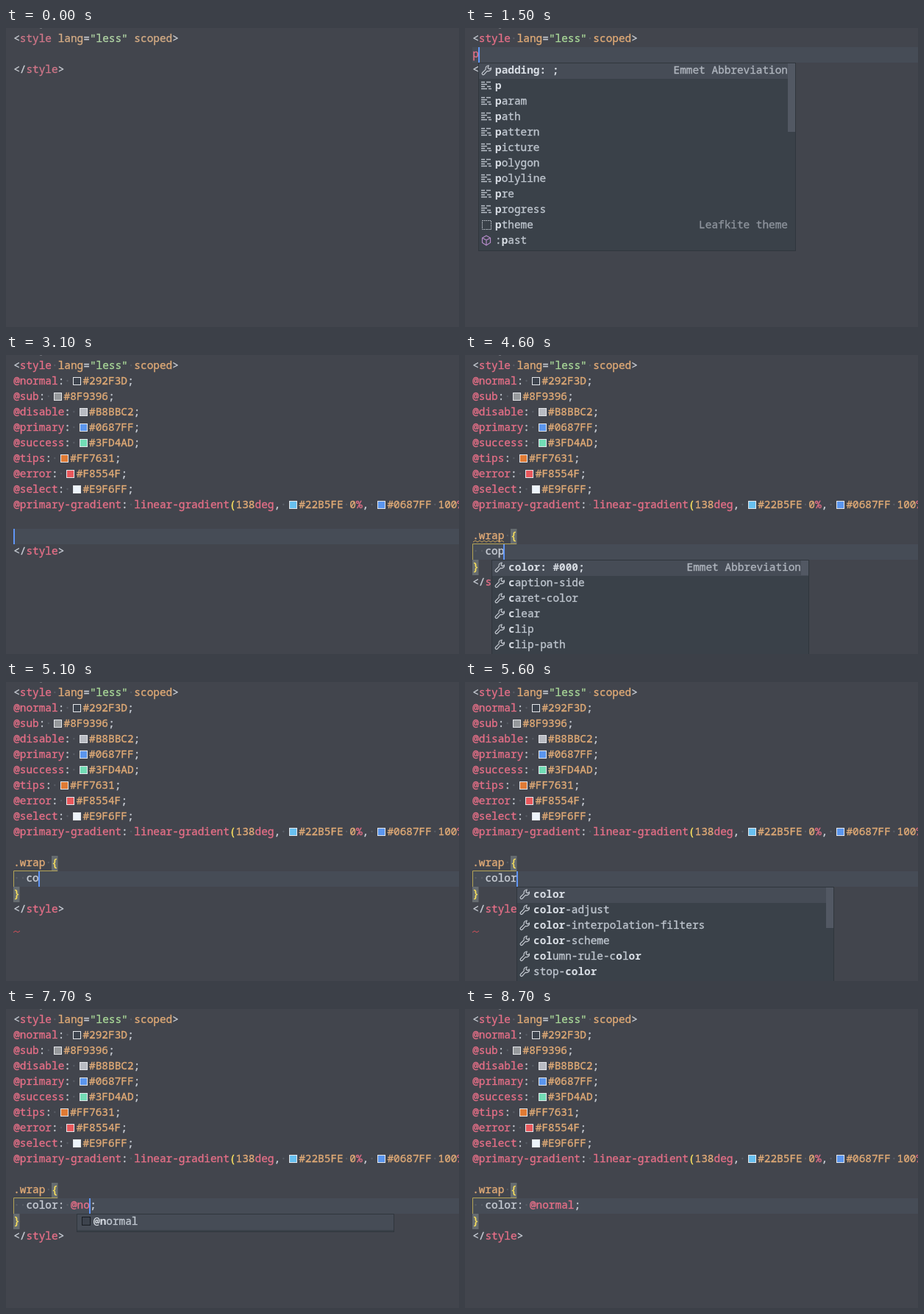
An HTML page for the animation above (8800 ms loop, 616 by 406 pixels).

```html
<!DOCTYPE html>
<html lang="en">
<head>
<meta charset="utf-8">
<title>Theme snippet in a code editor</title>
<style>
  html, body { margin: 0; width: 100%; height: 100%; overflow: hidden; background: #42454d; }
  svg { display: block; width: 616px; height: 406px; }
  text { font: 500 14.4px "Noto Sans Mono", "DejaVu Sans Mono", monospace; white-space: pre; stroke-width: .35px; }
  .bold { font-weight: 700; fill: #d8dde4; stroke: none; }
</style>
</head>
<body>
<svg id="stage" viewBox="0 0 616 406"></svg>
<script>
const stage = document.getElementById('stage');
const LOOP = 8800, CELL = 8.64, LEFT = 10.2, ROW = 21;
const PINK = '#e56f87', ORANGE = '#e0aa76', GREEN = '#a9d898', YELLOW = '#fbe25e';
const PLAIN = '#c9ced6', DOT = '#5a5f68';

// Swatch tones as they appear on screen
const tones = {
  '#292F3D': '#3d434d', '#8F9396': '#96999c', '#B8BBC2': '#b8bbc2', '#0687FF': '#5b96ee',
  '#3FD4AD': '#72dcb5', '#FF7631': '#e07b35', '#F8554F': '#e8585c', '#E9F6FF': '#edf3fa',
  '#22B5FE': '#68c0f0'
};

const HEAD = '<style lang="less" scoped>', TAIL = '</style>';
const vars = [
  '@normal: #292F3D;', '@sub: #8F9396;', '@disable: #B8BBC2;', '@primary: #0687FF;',
  '@success: #3FD4AD;', '@tips: #FF7631;', '@error: #F8554F;', '@select: #E9F6FF;',
  '@primary-gradient: linear-gradient(138deg, #22B5FE 0%, #0687FF 100%);'
].join('\n') + '\n';
const block = s => `${vars}\n.wrap {\n  ${s}\n}`;

// Suggestion lists: "icon|label with *bold* parts|detail"
const EMMET = 'Emmet Abbreviation';
const list = (col, items, barTop = 0, barHeight = 0) => ({ col, items, barTop, barHeight });
const popP = list(1, [
  `wrench|*padding: ;*|${EMMET}`,
  ...['', 'aram', 'ath', 'attern', 'icture', 'olygon', 'olyline', 're', 'rogress'].map(s => `lines|*p*${s}`),
  'snippet|*p*theme|Leafkite theme', 'cube|:*p*ast'
], 1, 93);
const popPt = list(1, ['snippet|*pt*heme|Leafkite theme', 'lines|*p*a*t*h', 'lines|*p*a*t*tern', 'lines|*p*ic*t*ure']);
const popPth = list(1, ['snippet|*pth*eme|Leafkite theme', 'lines|*p*a*th*']);
const popC = list(3, [
  `wrench|*color: #000;*|${EMMET}`,
  ...['aption-side', 'aret-color', 'lear', 'lip', 'lip-path'].map(s => `wrench|*c*${s}`)
], 1, 20);
const popColor = list(7, [
  'wrench|*color*', 'wrench|*color*-adjust', 'wrench|*color*-interpolation-filters',
  'wrench|*color*-scheme', 'wrench|*col*umn-rule-c*o*l*or*', 'wrench|stop-*color*'
], 1, 55);
const popAt = list(10, [
  'wrench|*@media screen {↵*|…   Emmet Abbreviati… ', '#B8BBC2|*@*disable', '#F8554F|*@*error',
  '#292F3D|*@*normal', '#0687FF|*@*primary', 'variable|*@*primary-gradient'
]);
const popNormal = list(10, ['#292F3D|*@n*ormal']);

// Squiggles: [x, y, width, colour]
const emptyRule = [11, 254, 42, '#c9a25c'], parseError = [10, 340, 9, '#d8505a'], missing = [97, 276, 8, '#d8505a'];

// [time, body with "|" as caret, popup, squiggle]
const steps = [
  [0, ''], [1300, '|'], [1400, 'p|'], [1500, 'p|', popP],
  [1900, 'pt|', popPt], [2200, 'pth|', popPth],
  [2600, vars + '|'], [3000, vars + '\n|'],
  ...['.', '.w', '.wr', '.wra', '.wrap', '.wrap '].map((s, i) => [3300 + i * 100, `${vars}\n${s}|`]),
  [3900, vars + '\n.wrap {|}'], [4000, block('|')],
  [4200, block('c|')], [4300, block('c|'), popC, emptyRule],
  [4400, block('co|'), popC, emptyRule], [4600, block('cop|'), popC, emptyRule],
  [4800, block('cop|')], [4900, block('co|'), 0, parseError], [5200, block('col|'), 0, parseError],
  [5300, block('colo|'), 0, parseError], [5400, block('color|'), 0, parseError],
  [5500, block('color|'), popColor, parseError],
  [5900, block('color: |;')], [6600, block('color: @|;'), 0, missing],
  [6700, block('color: @|;'), popAt, missing],
  [7200, block('color: @n|;'), popNormal], [7500, block('color: @no|;'), popNormal],
  [8100, block('color: @normal|;')]
];

const esc = s => s.replace(/&/g, '&amp;').replace(/</g, '&lt;');
const rect = (x, y, w, h, fill, more = '') => `<rect x="${x}" y="${y}" width="${w}" height="${h}" fill="${fill}" ${more}/>`;
const text = (x, y, color, s, more = '') => `<text x="${x}" y="${y}" fill="${color}" stroke="${color}" ${more}>${s}</text>`;
const line = (d, stroke, more = '') => `<path d="${d}" fill="none" stroke="${stroke}" ${more}/>`;
const rowTop = k => 5 + ROW * k;

const syntax = /(?<pink>@[\w-]+|style|linear-gradient|deg|%|^p\w*)|(?<orange>#\w+|\d+|lang|scoped|^\.\w*)|(?<green>"less")|(?<yellow>[({}])|(?<dot> )|(?<plain>[^\s@#%({}\d"a-z]+|\w+|.)/g;
const palette = { pink: PINK, orange: ORANGE, green: GREEN, yellow: YELLOW, dot: DOT, plain: PLAIN };

function codeRow(s, k, dots) {
  let x = LEFT, out = '';
  for (const m of s.matchAll(syntax)) {
    const kind = Object.keys(palette).find(n => m.groups[n]);
    const tone = tones[m[0]];
    if (tone) {
      out += rect(Math.round(x + 3) + .5, rowTop(k) + 4.5, 10, 10, tone, 'stroke="#e4e6ea"');
      x += 16.5;
    }
    if (kind !== 'dot') out += text(x, rowTop(k) + 14, palette[kind], esc(m[0]));
    else if (dots) out += text(x, rowTop(k) + 14, DOT, '·');
    x += m[0].length * CELL;
  }
  return out;
}

const icons = {
  wrench: line('M13.5 4.2a4 4 0 0 1-5.3 4.2L4 13a1.6 1.6 0 0 1-2.4-2.3L6.2 6.2A4 4 0 0 1 10.2 1L9 4l2 1.8z', '#c3c8d0', 'stroke-width="1.2"'),
  lines: line('M0 2.5h5m2 0h6M0 5.5h8M0 8.5h5m3 0h5M0 11.5h8m2 0h4', '#b9bfc8', 'stroke-width="1.3"'),
  snippet: rect(1.5, 1.5, 12, 12, 'none', 'stroke="#c3c8d0" stroke-dasharray="1.5 1"'),
  cube: line('M7 1l5.5 3v6.5L7 14l-5.5-3.5V4zM1.5 4L7 7l5.5-3M7 7v7', '#b48ac8', 'stroke-width="1.2"'),
  variable: line('M3 3H.5v9H3M11 3h2.5v9H11M4 6.5l3-2 3 1.5v3l-3 2-3-1.5zl3 1.5 3-2', '#6eb2e4', 'stroke-width="1.2"')
};

function popup({ col, items, barTop, barHeight }, row) {
  const x = Math.floor(LEFT + col * CELL), y = rowTop(row + 1);
  let out = rect(x + .5, y + .5, 431, items.length * ROW + 3, '#3a4149', 'stroke="#30363d"')
    + rect(x + 1, y + 1, 430, ROW, '#464c56');
  items.forEach((item, i) => {
    const [icon, label, detail = ''] = item.split('|'), top = y + i * ROW;
    out += icon[0] === '#'
      ? rect(x + 7.5, top + 4.5, 11, 11, tones[icon], 'stroke="#181c22"')
      : `<g transform="translate(${x + 4} ${top + 3})">${icons[icon]}</g>`;
    const parts = esc(label).split('*').map((s, n) => n % 2 ? `<tspan class="bold">${s}</tspan>` : s);
    out += text(x + 23, top + 15, '#bfc6cf', parts.join(''));
    out += text(x + 421, top + 15, i ? '#8e949d' : '#aeb4bd', detail, 'text-anchor="end"');
  });
  return out + rect(x + 421, y + barTop, 10, barHeight, '#525863');
}

function squiggle([x, y, w, color]) {
  let d = `M${x} ${y}`;
  for (let i = 0; i < w / 3; i++) d += `l3 ${i % 2 ? 2 : -2}`;
  return line(d, color);
}

function scene(t) {
  const [at, body, pop, wave] = steps.findLast(s => s[0] <= t);
  const rows = [HEAD, ...body.split('\n'), TAIL];
  const row = rows.findIndex(s => s.includes('|'));
  const inBlock = rows[13] === '}';
  let out = rect(46, 0, 3, 1, '#6b6e75');
  if (row > 0) out += rect(10, rowTop(row), 606, ROW, '#464c56');
  if (inBlock) {
    out += rect(62, 236, 8.5, ROW, '#666c70') + rect(10, 278, 8.5, ROW, '#666c70')
      + line('M70 256.5H10.5V278', '#b5a456');
  }
  const vivid = .76 + .06 * [100, 500, 1000].filter(n => t >= n).length;
  const code = rows.map((s, k) => codeRow(s.replace('|', ''), k, row > 0)).join('');
  out += row > 0 ? code : `<g style="filter:saturate(${vivid})">${code}</g>`;
  if (wave) out += squiggle(wave);
  if (pop) out += popup(pop, row);
  if (row > 0 && (t - at) % 1000 < 500) {
    const x = Math.round(LEFT + rows[row].indexOf('|') * CELL - 1);
    out += rect(Math.max(x, 10), rowTop(row), 2, ROW, '#6095f5');
  }
  return out;
}

let shown;
function tick(now) {
  const t = Math.floor(now % LOOP / 100) * 100;
  if (t !== shown) stage.innerHTML = scene(shown = t);
  requestAnimationFrame(tick);
}
tick(performance.now());
</script>
</body>
</html>
```
